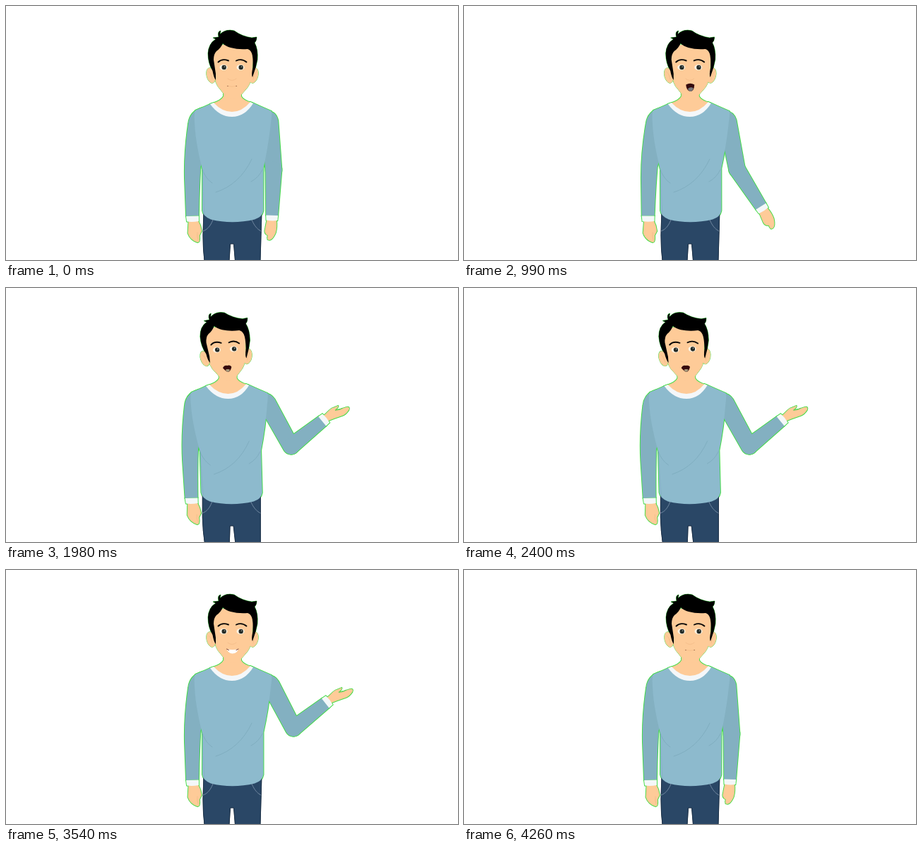
An HTML page that plays this animation: 640 by 360 pixels, repeating every 4.5 s.

```html
<!DOCTYPE html>
<html lang="en">
<head>
<meta charset="utf-8">
<title>Presenter</title>
<style>
  html, body { margin: 0; width: 100%; height: 100%; overflow: hidden; background: #fff; }
  svg { display: block; width: 100vw; height: 100vh; }
  .skin { fill: #fecb98; }
  .sleeve { fill: #83b0c1; }
  .shirt { fill: #8dbacd; }
  .white { fill: #f4f7f9; }
  .line { fill: none; stroke-linecap: round; }
  .fold { stroke: #7eacbe; stroke-width: .9; }
  .crease { stroke: #f3bb88; stroke-width: .8; }
  .brow { stroke: #050505; stroke-width: 1.9; }
  .stitch { stroke: #8ea3b8; stroke-width: .7; stroke-dasharray: 2 .7; }
</style>
</head>
<body>
<svg viewBox="0 0 640 360">
  <!-- thin key-colour fringe behind the figure -->
  <use href="#figure" stroke="#42dc45" stroke-width="1.9"/>
  <g id="figure">
    <path fill="#2a4766" stroke="#192c42" stroke-width=".8"
      d="M280 290L279 325Q279 345 281 361H316L317.500 337H322.500L324.500 361H360L362 290Z"/>
    <path class="line stitch" d="M293 303Q288 316 279 319M348 303Q353 315 361 319"/>

    <g id="leftArm">
      <path class="skin" d="M258.500 304H272Q276 311 277 319L274 325Q275 336 271 335Q261 332 257.500 322Z"/>
      <path class="line crease" d="M271 321Q270 327 272 331"/>
      <path class="sleeve" d="M278 144Q260 149 258 167Q252 208 253 245L255 298L273 297
        Q273.500 260 275.500 228Q283 205 284 170Z"/>
      <path class="white" d="M255 298L273 297.500V305Q264 306.500 256 305.500Z"/>
    </g>

    <g id="upperArm">
      <path class="sleeve" d="M-13 5Q-12 -9 0 -9Q10 -8 12 5L11.500 74A11.500 11.500 0 0 1 -11.500 74Z"/>
      <g id="foreArm">
        <path id="foreSleeve" class="sleeve" d="M-11.500 0A11.500 11.500 0 0 1 11.500 0L8.500 62H-8.500Z"/>
        <g id="wrist">
          <path id="restHand" class="skin" d="M-7 6H6.500Q8 16 6 24Q1 37 -5 34Q-6 31 -5 28Q-11 26 -9 18Z"/>
          <g id="openHand">
            <g transform="translate(0 6) rotate(128)">
              <path class="skin" d="M-3 -4C4 -9 6 -14 11 -15L18 -18Q19 -16 13 -11.500L21 -13L30 -16
                Q35 -17 33 -12Q29 -6 24 -4Q12 0 2 4Z"/>
              <path class="line" stroke="#58cf51" stroke-width="1" d="M14 -11.500L20 -12.500L24 -14.500"/>
            </g>
          </g>
          <path class="white" d="M-8.500 -.5H8.500L8 6.500Q0 8 -8 6.500Z"/>
        </g>
      </g>
    </g>

    <path class="skin" d="M308 118V128Q305 134 292 138Q304 153 320 153Q336 153 348 137Q336 134 333 128V118Z"/>
    <path class="shirt" d="M291 138Q278 144 268 148Q266 152 267 165C268 190 274 215 278 232L278 290
      Q279 298 290 302.500Q320 310 352 302.500Q363 299 364.500 290V230C369 210 373 185 375 165
      Q377 152 376 149Q362 143 349 137Q336 152 320 152Q304 152 291 138Z"/>
    <path class="line fold" d="M297 264Q331 253 348 217M278 232Q283 245 292 251M347 249Q358 243 363 232"/>
    <path class="line fold" stroke-opacity=".6" d="M279 232Q279 270 281 296"/>
    <path class="white" d="M289 139Q302 157 320 157Q338 157 350 138L346 136Q334 150 320 150Q306 150 294 137Z"/>

    <g id="head" stroke-width=".9">
      <ellipse class="skin" cx="290" cy="98.500" rx="6" ry="11" transform="rotate(-14 290 98)"/>
      <ellipse class="skin" cx="351" cy="98.500" rx="6" ry="11" transform="rotate(14 351 98)"/>
      <path class="line crease" d="M287 93Q291 96 292 104M355 93Q351 96 350 104"/>
      <path class="skin" d="M292 55L294 92L297 108Q299 114 304 119L311 128Q315 132 321 132Q327 132 331 128
        L339 119Q346 112 348 100L352 55Z"/>
      <path d="M297 105Q294 101 292.500 92Q286 81 286 67Q287 53 297 47L293 45L301 44Q299 36 304 35L303 40
        Q311 32 323 35Q334 43 348 45L355 44Q355 49 352 52Q357 61 356 76Q354 88 349 101
        Q347 98 349.500 87Q350 72 348 67Q346 62 342 61Q329 62 318 59Q311 57 307 53
        Q304 60 298 64Q294 68 294 76L297 96Z"/>
      <path class="line brow" d="M300.500 79.500Q306 74 315 77.500M326 77.500Q334 74 340.500 79.500"/>
      <g id="eye">
        <ellipse cx="308" cy="87" rx="5.500" ry="4" fill="#fff3e3"/>
        <circle cx="308.700" cy="87" r="3.200" fill="#232a26"/>
        <circle cx="309.500" cy="86" r=".8" fill="#a9b4b4"/>
      </g>
      <use href="#eye" x="24"/>
      <path class="line crease" d="M314 103Q320 108 326 103"/>

      <g id="closed">
        <path class="line crease" d="M314 113.500Q320 115 326 113.500"/>
        <path class="line" stroke="#7a4630" stroke-width="1" d="M313.800 113.500h.3M326 113.500h.3"/>
      </g>
      <g id="round">
        <path fill="#35090d" d="M314.500 111.500Q320.500 108 326.500 111.500Q326 121 320.500 121Q315 120 314.500 111.500Z"/>
        <path fill="#77777a" d="M317 117.500Q321 113.500 325 116.500Q324 121 320.500 121Q318 120 317 117.500Z"/>
      </g>
      <g id="small">
        <path fill="#35090d" d="M314.500 113Q317 109 321 110Q325 109 327 112Q325 119 321 119Q318 118 314.500 113Z"/>
        <path fill="#a99c7c" d="M318 116Q321 114 324.500 116Q323 119 321 119Q319 118 318 116Z"/>
      </g>
      <g id="smile">
        <path fill="#fff" d="M312.500 112Q321 114 329 112Q327 118.500 320.500 118.500Q315 118 312.500 112Z"/>
        <path class="line" stroke="#7b3a2c" stroke-width="1" d="M312.500 112L315.500 113.500M326 113.500L329 112"/>
      </g>
    </g>
  </g>
</svg>
<script>
const LOOP = 4500, STEP = 30, LAST = 4260;
const SPEECH = "scrscrcsrssscrsrc";
const SPEECH_START = 690, SYLLABLE = 120;
const MOUTHS = { c: "closed", r: "round", s: "small" };
const el = id => document.getElementById(id);
const move = (id, transform) => el(id).setAttribute("transform", transform);
const show = (id, on) => el(id).setAttribute("visibility", on ? "visible" : "hidden");
const mix = (a, b, p) => a + (b - a) * p;

function ease(t, from, to) {
  const p = Math.min(1, Math.max(0, (t - from) / (to - from)));
  return p < .5 ? 2 * p * p : 1 - 2 * (1 - p) ** 2;
}

// Rises from 0 to 1 over a..b and falls back over c..d
const pulse = (t, a, b, c, d) => ease(t, a, b) - ease(t, c, d);

function mouthAt(t) {
  if (t >= 3000 && t < 3900) return "smile";
  return MOUTHS[SPEECH[Math.floor((t - SPEECH_START) / SYLLABLE)]] || "closed";
}

function draw(t) {
  const lift = pulse(t, 720, 1460, 3560, 4220);
  const lean = pulse(t, 900, 1640, 2250, 2980);
  const swing = pulse(t, 90, 450, 750, 1230) + pulse(t, 2400, 2800, 3000, 3480);

  const skew = .028 * lean;
  move("figure", `matrix(1 0 ${skew} 1 ${-350 * skew} 0)`);
  move("head", `rotate(${-3 * lean} 320 130)`);
  move("leftArm", `rotate(${2.7 * swing} 270 158)`);

  const upper = mix(-4.6, -27.3, lift);
  const fore = mix(2, -128, lift);
  const reach = mix(65, 58, lift);
  move("upperArm", `translate(373 158.500) rotate(${upper})`);
  move("foreArm", `translate(0 74) rotate(${fore - upper})`);
  move("foreSleeve", `scale(1 ${reach / 62})`);
  move("wrist", `translate(0 ${reach})`);
  show("restHand", lift < .4);
  show("openHand", lift >= .4);
  move("openHand", `rotate(${40 * (1 - lift)} 0 6)`);

  const mouth = mouthAt(t);
  for (const id of ["closed", "round", "small", "smile"]) show(id, id === mouth);
}

const start = performance.now();
function tick() {
  const t = (performance.now() - start) % LOOP;
  draw(Math.min(LAST, Math.floor(t / STEP) * STEP));
  requestAnimationFrame(tick);
}
tick();
</script>
</body>
</html>
```
